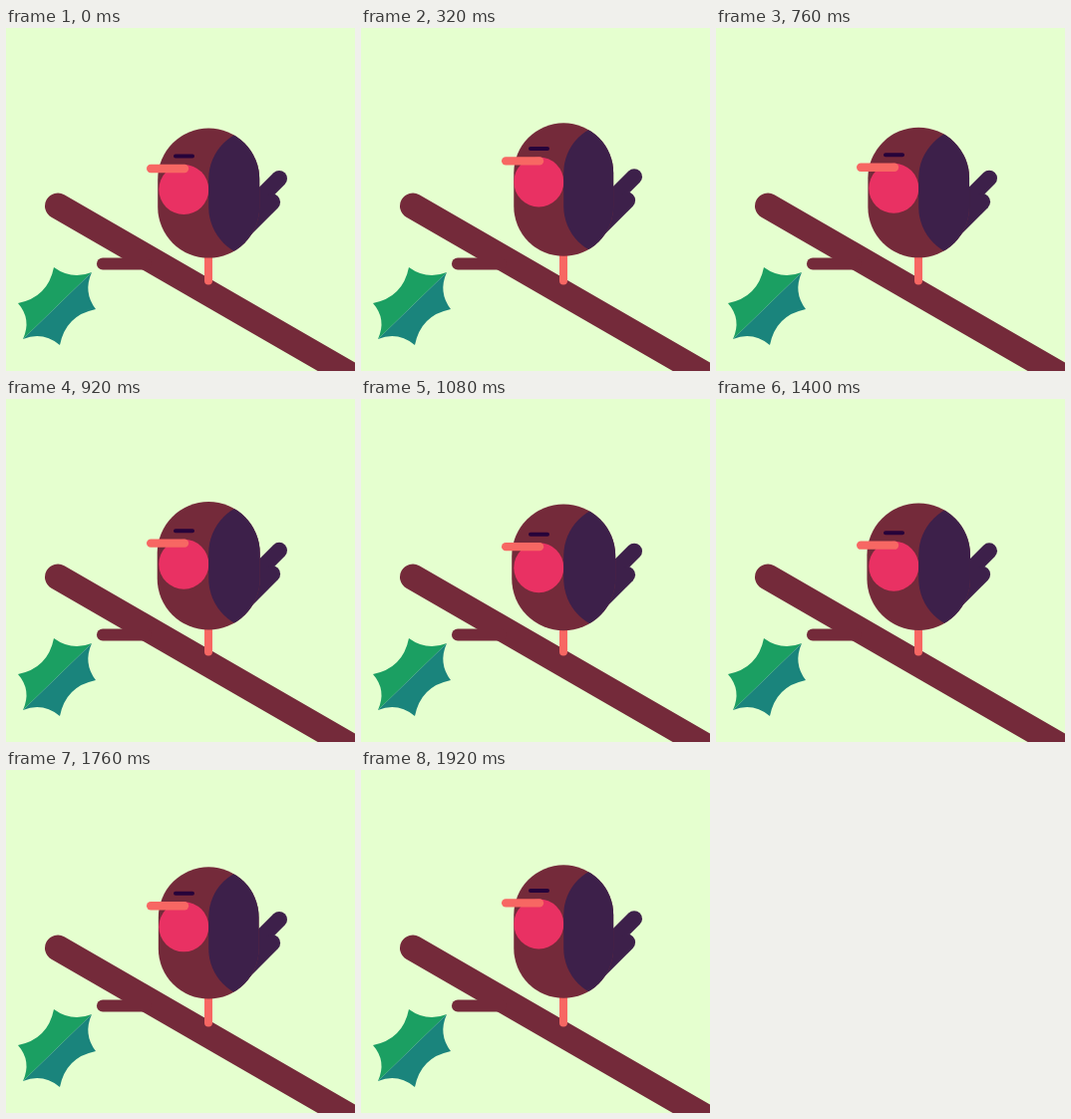
Animation of 350x344 px, one loop 1.96 s. Source, as an HTML page:

```html
<!DOCTYPE html>
<html>
<head>
<meta charset="utf-8">
<style>
html, body { margin: 0; height: 100%; overflow: hidden; background: #e5ffcf; }
svg { display: block; }
.line { fill: none; stroke-linecap: round; }
</style>
</head>
<body>
<svg width="350" height="344" viewBox="0 0 350 344">
  <clipPath id="bodyClip"><rect class="body"/></clipPath>

  <!-- leaf -->
  <path fill="#1b9f62" d="M86 245Q66 253 48 240Q42 270 12 276Q26 292 17 312Z"/>
  <path fill="#1a847c" d="M86 245Q77 265 90 282Q60 288 54 318Q37 304 17 312Z"/>

  <!-- branch -->
  <g class="line" stroke="#742a3a">
    <path stroke-width="26" d="M52 178.5L400 379.4"/>
    <path stroke-width="12" d="M97 236.5H140"/>
  </g>

  <!-- bird -->
  <path class="line" stroke="#f76763" stroke-width="8" d="M203 220V253.5"/>
  <g id="tail" class="line" stroke="#3d204a">
    <path stroke-width="16" d="M274 151L230 195"/>
    <path stroke-width="16.6" d="M266.8 174.6L234 207.4"/>
  </g>
  <rect class="body" fill="#742a3a"/>
  <g class="face"><circle cx="178.3" cy="162" r="25" fill="#e93163"/></g>
  <g clip-path="url(#bodyClip)"><rect id="wing" fill="#3d204a"/></g>
  <g class="face line">
    <path stroke="#26033a" stroke-width="4" d="M170 128.5H187"/>
    <path stroke="#f76763" stroke-width="8.4" d="M145.2 141H179"/>
  </g>
</svg>
<script>
const LOOP = 1960, STEP = 40, PERIOD = 1600;
const all = s => document.querySelectorAll(s);
const shift = (el, y) => el.setAttribute('transform', `translate(0 ${y})`);

function setRect(el, x, top, bottom, r) {
  const box = { x, y: top, width: 2 * r, height: bottom - top, rx: r, ry: r };
  for (const k in box) el.setAttribute(k, box[k]);
}

function draw(now) {
  const t = Math.floor(now % LOOP / STEP) * STEP;
  const dip = -Math.sin(2 * Math.PI * t / PERIOD);
  const top = 100.6 + 5.5 * dip, bottom = 230.6 + 1.9 * dip, r = 51 + 1.1 * dip;
  all('.body').forEach(el => setRect(el, 203.2 - r, top, bottom, r));
  setRect(wing, 203.2, top, bottom, r);
  all('.face').forEach(el => shift(el, 8 * dip));
  shift(tail, 1.9 * dip);
}

const start = performance.now();
function tick() {
  draw(performance.now() - start);
  requestAnimationFrame(tick);
}
tick();
</script>
</body>
</html>
```
